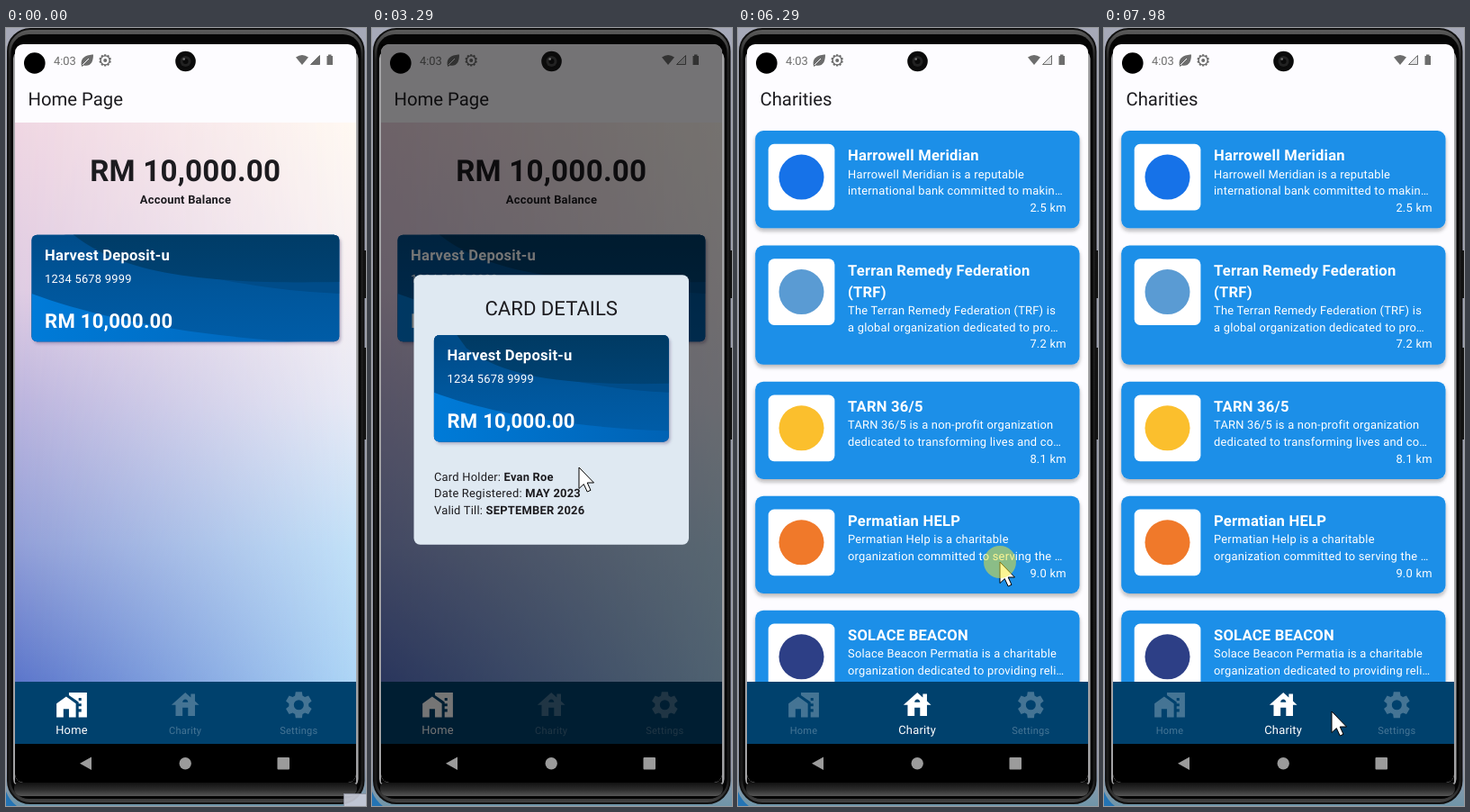
An HTML page that plays this animation: 400x864 px, repeating every 8 s.

```html
<!DOCTYPE html>
<html lang="en">
<head>
<meta charset="utf-8">
<title>Banking app</title>
<style>
html, body { margin: 0; width: 100%; height: 100%; overflow: hidden; background: #9fa3b3; }
svg { display: block; width: 400px; height: 864px; }
text { font-family: Roboto, "Open Sans", sans-serif; letter-spacing: .23px; white-space: pre; text-rendering: geometricPrecision; }
.b { font-weight: 700; }
.s { font-size: 12.9px; }
.m { font-size: 16.58px; }
.l { font-size: 22.1px; }
.t { font-size: 20.3px; letter-spacing: 0; }
.mid { text-anchor: middle; }
.end { text-anchor: end; }
</style>
</head>
<body>
<svg id="stage" viewBox="0 0 400 864"></svg>
<script>
const stage = document.getElementById('stage');
const $ = id => document.getElementById(id);
const clamp = (v, a = 0, b = 1) => Math.min(b, Math.max(a, v));
const ramp = (t, from, to) => clamp((t - from) / (to - from));

const text = (x, y, s, cls = 's', extra = '') => `<text x="${x}" y="${y}" class="${cls}" ${extra}>${s}</text>`;
const rect = (x, y, w, h, fill, extra = '') => `<rect x="${x}" y="${y}" width="${w}" height="${h}" fill="${fill}" ${extra}/>`;
const circle = (x, y, r, fill, extra = '') => `<circle cx="${x}" cy="${y}" r="${r}" fill="${fill}" ${extra}/>`;
const gradient = (id, stops, dir = 'x2="0" y2="1"') => `<linearGradient id="${id}" ${dir}>` +
  stops.map(([o, c]) => `<stop offset="${o}" stop-color="${c}"/>`).join('') + '</linearGradient>';
const shadow = (id, dx, dy, blur, color) => `<filter id="${id}" x="-10%" y="-10%" width="120%" height="130%">
  <feDropShadow dx="${dx}" dy="${dy}" stdDeviation="${blur}" flood-color="${color}" flood-opacity=".32"/></filter>`;

// Toothed wheel around (12,12) in a 24 unit box, with a hole
function gear(teeth, outer, inner, hole) {
  const pts = [], step = 360 / teeth;
  for (let i = 0; i < teeth; i++)
    for (const [r, k] of [[inner, -.37], [outer, -.23], [outer, .23], [inner, .37]]) {
      const a = (i + k) * step * Math.PI / 180;
      pts.push((12 + r * Math.sin(a)).toFixed(2) + ' ' + (12 - r * Math.cos(a)).toFixed(2));
    }
  return `M${pts.join('L')}ZM${12 - hole} 12a${hole} ${hole} 0 1 0 ${2 * hole} 0a${hole} ${hole} 0 1 0 ${-2 * hole} 0Z`;
}

const tabs = [
  ['Home', 73, 'M1 11v10h5v-6h4v6h5V11L8 6zM10 3v1.97l7 5V11h2v2h-2v2h2v2h-2v4h6V3zM19 9h-2V7h2z'],
  ['Charity', 199.2, 'M19 9.3V4h-3v2.6L12 3 2 12h3v8h5v-6h4v6h5v-8h3zM10 10c0-1.1.9-2 2-2s2 .9 2 2z'],
  ['Settings', 325.3, gear(6, 9.7, 7.2, 3.6)]
];

const charities = [
  [114, 108.3, ['Harrowell Meridian'], 'Harrowell Meridian is a reputable', 'international bank committed to makin…', '2.5 km', '#1672e8'],
  [241.5, 132.3, ['Terran Remedy Federation', '(TRF)'], 'The Terran Remedy Federation (TRF) is', 'a global organization dedicated to pro…', '7.2 km', '#5a9bd3'],
  [392.7, 108.3, ['TARN 36/5'], 'TARN 36/5 is a non-profit organization', 'dedicated to transforming lives and co…', '8.1 km', '#fbbf2d'],
  [519.7, 108.3, ['Permatian HELP'], 'Permatian Help is a charitable', 'organization committed to serving the …', '9.0 km', '#f0792a'],
  [646.7, 108.3, ['SOLACE BEACON'], 'Solace Beacon Permatia is a charitable', 'organization dedicated to providing reli…', '12.4 km', '#2d3f86']
];

function charityCard([y, h, title, line1, line2, km, mark]) {
  const d = y + 24 * (title.length - 1);
  return rect(19.2, y, 360.3, h, '#1c8fe8', 'rx="9" filter="url(#low)"') +
    rect(33.7, y + 14.8, 73.7, 73.7, '#fff', 'rx="6.5"') + circle(70.5, y + 51.6, 25, mark) +
    `<g fill="#fff">${title.map((s, i) => text(122, y + 33 + 24 * i, s, 'm b')).join('')}` +
    text(122, d + 52.7, line1) + text(122, d + 71.2, line2) + text(364.7, d + 89.8, km, 's end') + '</g>';
}

// Account card; the wave artwork covers the width and is cropped vertically
function bankCard(id, x, y, w) {
  const k = w / 342;
  return `<g transform="translate(${x} ${y})">` +
    `<clipPath id="${id}"><rect width="${w}" height="118.5" rx="6"/></clipPath>` +
    rect(0, 0, w, 118.5, '#00508f', 'rx="6" filter="url(#side)"') +
    `<g clip-path="url(#${id})"><g transform="translate(0 ${59.2 - 96 * k}) scale(${k})">` +
    rect(0, 0, 342, 192, 'url(#wave)') +
    '<path d="M0 0H342V102Q180 96 0 22Z" fill="#004c89"/>' +
    '<path d="M20 0L47 37C100 78 180 92 342 89V0Z" fill="url(#deep)"/>' +
    '<path d="M0 102C70 128 180 152 342 158V192H0Z" fill="url(#bright)"/></g></g><g fill="#fff">' +
    text(14.7, 28, 'Harvest Deposit-u', 'm b') + text(14.7, 53.3, '1234 5678 9999') +
    text(14.7, 103, 'RM 10,000.00', 'l b') + '</g></g>';
}

const detail = (y, label, value) =>
  `<text x="69" y="${y}" class="s">${label}: <tspan class="b">${value}</tspan></text>`;

stage.innerHTML = `<defs>
  ${gradient('left', [[0, '#f0d7e3'], [.3, '#dfcce3'], [.5, '#bcb5de'], [.75, '#93a0d8'], [1, '#5c76cb']])}
  ${gradient('right', [[0, '#fff9f2'], [.3, '#f6eff2'], [.5, '#e8eaf5'], [.76, '#c2e1f8'], [1, '#aed6f6']])}
  ${gradient('across', [[0, '#000'], [1, '#fff']], 'color-interpolation="sRGB"')}
  ${gradient('wave', [[0, '#00467f'], [.5, '#00569b'], [1, '#0060ae']])}
  ${gradient('deep', [[0, '#00385f'], [1, '#004273']])}
  ${gradient('bright', [[0, '#007bd8'], [1, '#0062b4']], '')}
  ${gradient('desk', [[0, '#a6a9b8'], [.95, '#9a9eb0'], [1, '#6f95a8']])}
  ${gradient('chin', [[0, '#0a0a0a'], [.6, '#2e2e2e'], [1, '#565656']])}
  ${gradient('rim', [[0, '#5d5d5d'], [.04, '#222'], [.97, '#1a1a1a'], [1, '#444']])}
  <mask id="fade">${rect(10, 105, 379, 621, 'url(#across)')}</mask>
  <clipPath id="screen"><rect x="10" y="18" width="379" height="820" rx="9"/></clipPath>
  <clipPath id="body"><rect x="10" y="105" width="379" height="621"/></clipPath>
  ${shadow('low', 0, 3, 2, '#222')}${shadow('side', 2, 2.5, 1.8, '#436')}
</defs>
${rect(0, 0, 400, 864, 'url(#desk)')}
<path d="M0 848Q4 858 12 864H0Z" fill="#2474b4"/>
${rect(396, 247, 4, 53, '#151515')}${rect(396, 355, 4, 102, '#151515')}
${rect(2, 1, 395.5, 860, 'url(#rim)', 'rx="25" stroke="#111" stroke-width="2"')}
${rect(5.5, 7, 389, 849, '#050505', 'rx="20"')}
${rect(8, 24, 383.5, 820, '#a3a3a5', 'rx="10"')}
<path d="M10 18H389V838H10Z" fill="#000"/>
${rect(9, 836, 381, 17, 'url(#chin)', 'rx="8"')}
<g clip-path="url(#screen)">
  ${rect(10, 18, 379, 820, '#fdfcff')}
  <g id="home">
    ${rect(10, 105, 379, 621, 'url(#left)')}
    <g mask="url(#fade)">${rect(10, 105, 379, 621, 'url(#right)')}</g>
    <g fill="#1c1b1f">
      ${text(199.2, 169.8, 'RM 10,000.00', 'b mid', 'font-size="33.17"')}
      ${text(199.5, 195.3, 'Account Balance', 's b mid')}
    </g>
    ${bankCard('cardClip', 28.4, 229.8, 342)}
  </g>
  <g id="list" clip-path="url(#body)"><g id="cards">${charities.map(charityCard).join('')}</g></g>
  ${rect(10, 18, 379, 87, '#e7eff4', 'id="tint"')}
  <text id="title" x="24.5" y="85.6" class="t" fill="#1c1b1f"></text>
  <g fill="#6d6d6d">
    ${text(53, 40.5, '4:03', 's', 'style="letter-spacing:0"')}
    <path d="M84 42C82 32 90 30 97 29.500C97 38 94 43 86.500 41.500L84.500 43Z"/>
    <path d="M85 41L92 34" stroke="#fdfcff"/>
    <path transform="translate(102.600 28.300) scale(.63)" fill-rule="evenodd" d="${gear(10, 10.8, 8.8, 6.8)}"/>
    ${circle(110.2, 35.9, 2)}
    <path d="M322 32.500Q329 27.500 336 32.500L329 41Z"/>
    <path id="signal" d="M348.500 30.500V40.500H338.500Z" stroke="#6d6d6d"/>
    <path d="M356.500 31H358V29.500H361.500V31H363V41H356.500Z"/>
  </g>
  ${rect(10, 726, 379, 69, '#00416d')}
  ${tabs.map(([name, x, d], i) => `<g id="tab${i}" fill="#fff">
    <path fill-rule="evenodd" transform="translate(${x - 18.4} 733.300) scale(1.535)" d="${d}"/>
    ${text(x, 783.8, name, 'mid')}</g>`).join('')}
  <g id="dialog">
    ${rect(10, 18, 379, 777, '#000', 'opacity=".54"')}
    ${rect(46.5, 274.3, 305.5, 299.5, '#dfe9f2', 'rx="7"')}
    <g fill="#1c1b1f">
      ${text(199.2, 318.8, 'CARD DETAILS', 'l mid', 'style="letter-spacing:0"')}
      ${detail(502.7, 'Card Holder', 'Evan Roe')}
      ${detail(521.2, 'Date Registered', 'MAY 2023')}
      ${detail(539.7, 'Valid Till', 'SEPTEMBER 2026')}
    </g>
    ${bankCard('detailClip', 68.8, 341, 261)}
  </g>
  ${rect(10, 795, 379, 43, '#000')}
  <path d="M95 809.500V824L82 816.800Z" fill="#9b9b9b"/>
  ${circle(199.2, 816.8, 6.7, '#9b9b9b')}${rect(301.5, 810, 13.5, 13.5, '#9b9b9b', 'rx="1"')}
</g>
${circle(31.8, 39, 11.8, '#000')}
${circle(199.5, 37, 11.3, '#0b0b0b')}${circle(199.5, 37, 6, '#222')}${circle(199.5, 37, 3, '#0a0a0a')}${circle(197.7, 34.5, 1.3, '#777')}
${rect(375.5, 850.5, 30, 20, '#c9ccd9', 'id="tip" stroke="#9194a2"')}
<g id="pointer">
  <path d="M0 0V23.500L5.300 18.600 9.200 27 13 25.300 9.200 17H16.500Z" fill="#fff" stroke="#000" stroke-linejoin="round"/>
  ${circle(0, 0, 18, '#faeb28', 'id="press"')}
</g>`;

const path = [
  [1600, 400, 866], [2300, 183, 302], [2480, 183, 302], [3240, 230, 488], [3290, 230, 488],
  [3640, 225, 641], [3850, 225, 641], [4110, 207, 782], [4380, 207, 782], [4480, 207, 767],
  [4770, 207, 767], [4980, 222, 800], [5280, 345, 806], [5580, 333, 779], [5790, 311, 700],
  [6020, 262, 418], [6240, 291, 593], [6430, 291, 593], [7100, 283, 229], [7240, 283, 229],
  [7840, 255, 745], [7970, 253, 759], [8000, 253, 759]
];
const presses = [[2330, 2470], [3600, 3740], [4440, 4720], [6230, 7850]];

// Smooth curve through the path points that never overshoots them
function pointerAt(t) {
  const i = clamp(path.findIndex(p => p[0] > t) - 1, 0, path.length - 2);
  const slope = (j, a) => path[j] && path[j + 1] ? (path[j + 1][a] - path[j][a]) / (path[j + 1][0] - path[j][0]) : 0;
  const speed = (j, a) => {
    const p = slope(j - 1, a), q = slope(j, a);
    return p * q > 0 ? 2 * p * q / (p + q) : 0;
  };
  const span = path[i + 1][0] - path[i][0], u = clamp((t - path[i][0]) / span), v = 1 - u;
  return [1, 2].map(a => v * v * (1 + 2 * u) * path[i][a] + u * u * (3 - 2 * u) * path[i + 1][a] +
    span * u * v * (v * speed(i, a) - u * speed(i + 1, a)));
}

// List offset plus the stretch at its end or start while dragging
function listTransform(t, y) {
  const max = 38, pull = d => 1 - Math.exp(-Math.max(0, d) / 80);
  if (t < 6430) return '';
  if (t < 7240) {
    const drag = 577 - y, s = 1 + .027 * pull(drag - max);
    return `translate(0 ${726 * (1 - s) - s * clamp(drag, 0, max)}) scale(1 ${s})`;
  }
  const back = y - 229, low = 1 + .027 * Math.exp(-back / 15);
  if (back < max) return `translate(0 ${726 * (1 - low) - low * (max - back)}) scale(1 ${low})`;
  const s = 1 + .02 * pull(back - max) * (1 - ramp(t, 7800, 7960));
  return `translate(0 ${105 * (1 - s)}) scale(1 ${s})`;
}

const show = (id, on) => $(id).setAttribute('opacity', +on);

function draw(t) {
  const [x, y] = pointerAt(t), charity = t >= 4790;
  show('home', !charity);
  show('list', charity);
  $('title').textContent = charity ? 'Charities' : 'Home Page';
  show('tint', ramp(t, 6480, 6680) - ramp(t, 7300, 7500));
  $('cards').setAttribute('transform', listTransform(t, y));
  show('dialog', ramp(t, 2440, 2600) - ramp(t, 3850, 4010));
  $('signal').setAttribute('fill', t < 910 ? '#6d6d6d' : '#e2e2e4');
  show('tip', .9 * (t < 400));

  const p = ramp(t, 4770, 4970), ease = p * p * (3 - 2 * p);
  [1 - ease, ease, 0].forEach((on, i) => {
    show('tab' + i, .27 + .73 * on);
    $('tab' + i).lastElementChild.setAttribute('font-size', 11.06 + 1.84 * on);
  });

  show('pointer', t >= 1630);
  $('pointer').setAttribute('transform', `translate(${x} ${y})`);
  show('press', .5 * presses.some(([a, b]) => t >= a && t < b));
}

const start = performance.now();
(function frame() {
  draw((performance.now() - start) % 8000);
  requestAnimationFrame(frame);
})();
</script>
</body>
</html>
```
